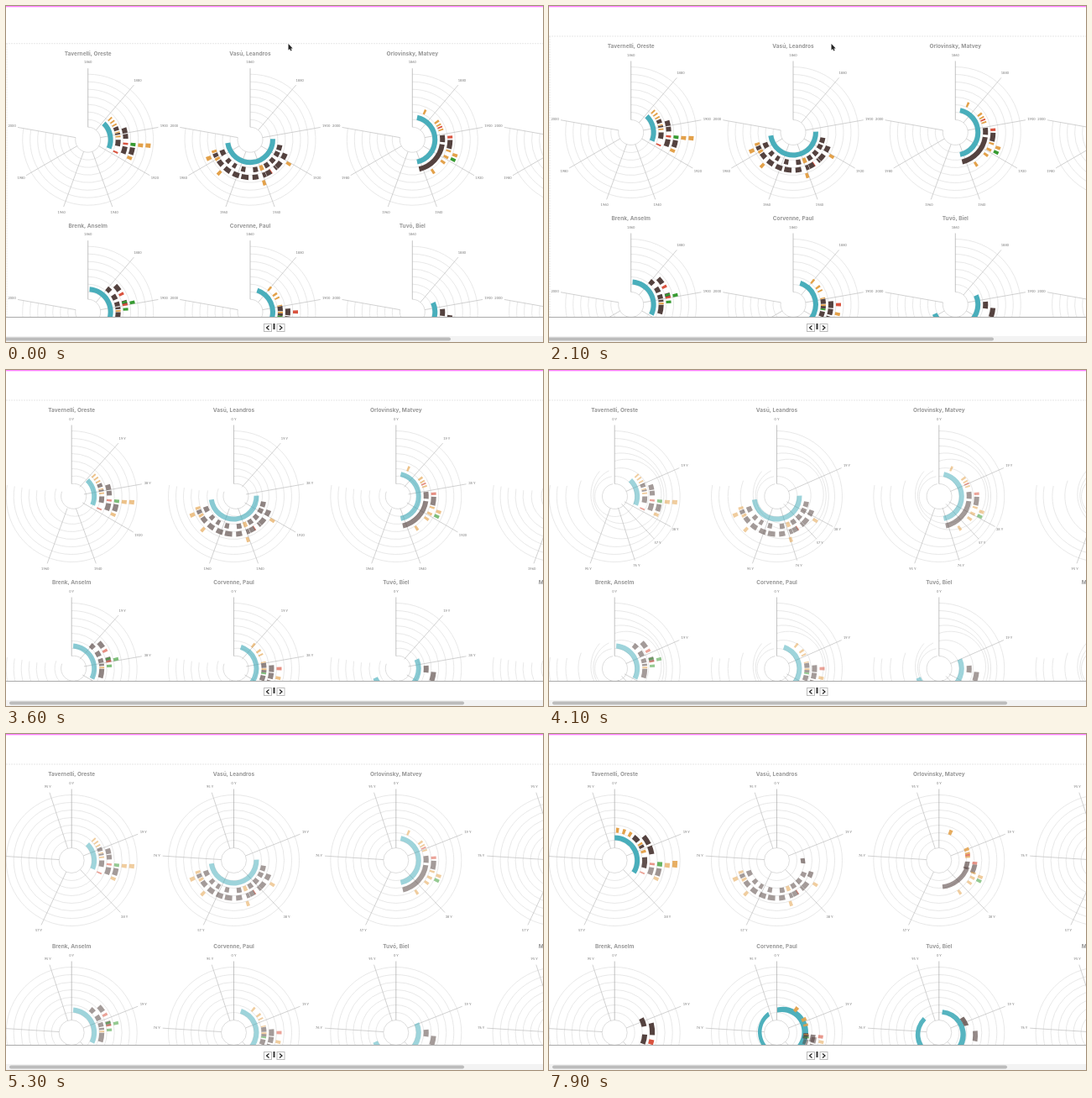
Animation of 640 by 400 pixels, one loop 8 s. Source, as an HTML page with a canvas:

```html
<!DOCTYPE html>
<html lang="en">
<head>
<meta charset="utf-8">
<title>Radial timelines</title>
<style>
html, body { margin: 0; width: 100%; height: 100%; overflow: hidden; background: #fff; }
canvas { display: block; width: 640px; height: 400px; }
</style>
</head>
<body>
<canvas id="stage" width="640" height="400"></canvas>
<script>
const ctx = document.getElementById('stage').getContext('2d');
const LOOP = 8000, COL = 193.3, ROW = 205;
const COLORS = { t: '#49aebb', b: '#54423f', o: '#e3a14a', r: '#d9533f', g: '#379b32' };

// Bars: ring, colour, then centre:width pairs in degrees. Two degrees are one year.
const artists = [
  { name: 'Tavernelli, Oreste', col: 0, row: 0, birth: 44, death: 112, start: 6500, step: 75, bars:
    '1o 47:3 54:3 61:3 76:2 84:3|1b 69:7 79:3 96:12|1r 114:3|2b 76:8 85:7 106:11|2r 96:3|3g 96:4|3b 104.5:9|3o 113.5:4|4o 96:4|5o 95.5:4' },
  { name: 'Vasú, Leandros', col: 1, row: 0, birth: 88, death: 262, start: 7390, step: 130, hide: 7300, bars:
    '1b 105:10 118:9 133:9 147:9 170:9 193:8 211:7 226:8 245:10|1o 158:7|2b 116:9 131:10 138:3 151:8 158:5 172:9 188:11 202:10 217:10 232:9 246:6|2r 147:2|2o 240:4 252:4|3o 122:4 162:4 223:4 246:5' },
  { name: 'Orlovinsky, Matvey', col: 2, row: 0, birth: 12, death: 168, start: 7260, step: 40, hide: 6500, bars:
    '1o 24:4 54:4 61:3 71:3|1r 66:3|1b 88:13 133:68|2r 86:4|2b 97:13|2o 107:3 117:4 126:4 147:4|3o 110:4|3g 116:4' },
  { name: 'Brenk, Anselm', col: 0, row: 1, birth: 4, death: 116, start: 6600, step: 50, hide: 6500, bars:
    '1b 43:9 61:10 75:8 83:4 99:17|1o 88:3|2b 51:10 76:7|2r 62:4 79:3|2g 75:3 86:4|3g 78:4' },
  { name: 'Corvenne, Paul', col: 1, row: 1, birth: 18, death: 207, start: 7150, step: 60, bars:
    '1o 40:4 55:4 63:3 78:2 91:3|1b 84:9 95:5 108:10|1g 99:3|2b 90:10 101:9 111:6|3r 90:4|3o 102:4' },
  { name: 'Tuvó, Biel', col: 2, row: 1, birth: 66, death: 246, start: 7240, step: 150, bars: '1b 91:13|2b 102:14' },
  { name: '', col: 3, row: 0 },
  { name: 'Marvelen, Dirk', col: 3, row: 1 }
];

for (const a of artists) {
  if (!a.bars) { a.list = []; continue; }
  const bars = a.bars.split('|').flatMap(group => {
    const [key, ...spans] = group.split(' ');
    return spans.map(s => {
      const [mid, w] = s.split(':').map(Number);
      return { ring: +key[0], color: key[1], from: mid - w / 2, to: mid + w / 2 };
    });
  }).sort((p, q) => p.from - q.from);
  a.list = [{ ring: 0, color: 't', from: a.birth, to: a.death }, ...bars];
}

const clamp = u => Math.max(0, Math.min(1, u));
const lerp = (a, b, p) => a + (b - a) * p;
const span = (t, start, length) => clamp((t - start) / length);
const ease = u => u < .5 ? 4 * u ** 3 : 1 - 4 * (1 - u) ** 3;
const polar = (deg, r) => [r * Math.sin(deg * Math.PI / 180), -r * Math.cos(deg * Math.PI / 180)];
const between = (a, b, r, p) => {
  const u = polar(a, r), v = polar(b, r);
  return [lerp(u[0], v[0], p), lerp(u[1], v[1], p)];
};

function line(points, color, width = .7) {
  ctx.strokeStyle = color;
  ctx.lineWidth = width;
  ctx.beginPath();
  points.forEach(p => ctx.lineTo(...p));
  ctx.stroke();
}

function label(text, x, y, font, color) {
  ctx.font = font;
  ctx.fillStyle = color;
  ctx.fillText(text, x, y);
}

// End points travel straight while the radius stays, so arcs drift on the way.
function drawRing(r, p) {
  const path = p < 1
    ? new Path2D(`M0,${-r}A${r},${r} 0 1 1 ${between(280, 352, r, p)}`)
    : new Path2D(`M0,${-r}A${r},${r} 0 1 1 0,${r}A${r},${r} 0 1 1 0,${-r}`);
  ctx.lineWidth = .7;
  ctx.strokeStyle = r > 15 ? '#dedede' : '#cfcfcf';
  ctx.stroke(path);
}

function drawGrid(t) {
  for (let j = 0; j < 8; j++) {
    drawRing(15 + 9 * j, ease(span(t, 3200 + 170 * Math.max(0, j - 1), 1000)));
  }
  const count = t < 2800 ? 8 : 6;
  for (let i = 0; i < count; i++) {
    const start = 3200 + 170 * i, p = ease(span(t, start, 1000));
    const at = r => between(40 * i, 68.4 * i, r, p);
    line([at(15), at(85)], i ? '#bdbdbd' : '#aaa');
    label(t < start ? 1860 + 20 * i : 19 * i + ' Y', ...at(92), '4px Lato, sans-serif', '#777');
  }
}

function drawBar({ ring, color, from, to }, birth, p) {
  const inner = 24 + 9 * ring, outer = inner + 6;
  const large = to - from >= 180 || (p === 1 && to - from > 100) ? 1 : 0;
  const point = (deg, r) => between(deg, (deg - birth) * 1.8, r, p);
  ctx.fillStyle = COLORS[color];
  ctx.fill(new Path2D(
    `M${point(from, outer)}A${outer},${outer} 0 ${large} 1 ${point(to, outer)}` +
    `L${point(to, inner)}A${inner},${inner} 0 ${large} 0 ${point(from, inner)}Z`));
}

function drawArtist(a, t, left, top) {
  ctx.save();
  ctx.translate(left + COL * a.col, top + ROW * a.row);
  drawGrid(t);
  label(a.name, 0, -102, '700 6.5px Inter, sans-serif', '#969696');
  const dim = lerp(1, .53, span(t, 2700, 1200));
  a.list.forEach((bar, i) => {
    if (!i && t >= a.hide) return;
    const p = ease(span(t, a.start + i * a.step, 1000));
    ctx.globalAlpha = lerp(dim, 1, p);
    drawBar(bar, a.birth, p);
  });
  ctx.restore();
}

function drawControls(shifted) {
  line([[0, 370.5], [640, 370.5]], '#aaa', 1);
  for (const [x, d] of [[312, 1], [327.5, -1]]) {
    ctx.strokeStyle = '#bbb';
    ctx.lineWidth = 1;
    ctx.strokeRect(x - 4.5, 378.5, 9, 9);
    line([[x + 1.5 * d, 380.5], [x - 1.5 * d, 383], [x + 1.5 * d, 385.5]], '#222', 1.2);
  }
  ctx.fillStyle = '#333';
  ctx.fillRect(318.5, 378, 2, 7);
  ctx.fillStyle = '#f3f3f3';
  ctx.fillRect(0, 393, 640, 7);
  ctx.fillStyle = '#bcbcbc';
  ctx.beginPath();
  ctx.roundRect(shifted ? 4 : -4, 394.5, shifted ? 542 : 534, 4, 2);
  ctx.fill();
}

function drawCursor(x, y) {
  ctx.beginPath();
  [[0, 0], [0, 7.5], [1.7, 6], [2.9, 8.6], [4.1, 8], [3, 5.6], [5.2, 5.4]]
    .forEach(([dx, dy]) => ctx.lineTo(x + dx, y + dy));
  ctx.closePath();
  ctx.fillStyle = '#222';
  ctx.fill();
}

function draw(t) {
  const shifted = t >= 3200;
  const left = shifted ? 78.2 : 97.7;
  const top = 150.5 + 8.7 * (1 - ease(span(t, 100, 700)));
  ctx.fillStyle = '#fff';
  ctx.fillRect(0, 0, 640, 400);
  ctx.textAlign = 'center';
  ctx.textBaseline = 'middle';

  ctx.save();
  ctx.beginPath();
  ctx.rect(0, 0, 640, 370);
  ctx.clip();
  ctx.setLineDash([2, 1]);
  line([[0, top - 114.5], [640, top - 114.5]], '#ddd');
  if (!shifted) line([[1, top - 114.5], [1, 370]], '#e2e2e2');
  ctx.setLineDash([]);
  artists.forEach(a => drawArtist(a, t, left, top));
  ctx.restore();

  drawControls(shifted);
  ctx.fillStyle = '#ff80ff';
  ctx.fillRect(0, 0, 640, 1.3);
  if (t < 2850) drawCursor(336.5, 45);
}

function tick() {
  draw(performance.now() % LOOP);
  requestAnimationFrame(tick);
}
tick();
</script>
</body>
</html>
```
